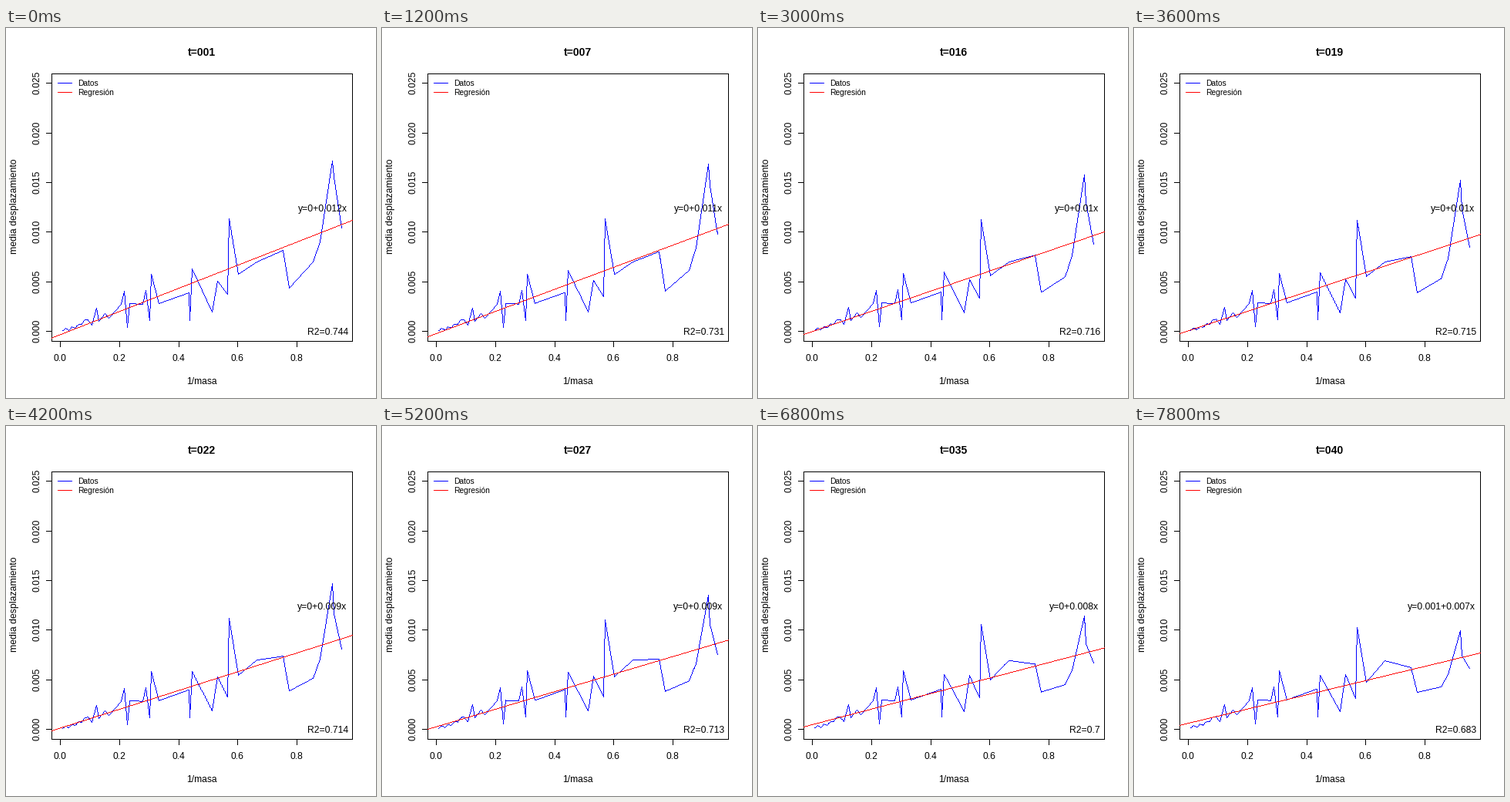
A matplotlib script that plays this animation: 480x480 px, repeating every 8 s.

```python
import numpy as np
import matplotlib.pyplot as plt
from matplotlib.animation import FuncAnimation

SIZE, DPI = 480, 100
STEPS, INTERVAL = 40, 200
PT = 72 / DPI                       # points per pixel
LEFT, RIGHT, TOP, BOTTOM = 59, 449, 59, 406
X0, X_UNIT = 69.9, 384.0            # pixel of x = 0, pixels per unit
Y0, Y_UNIT = 393.3, 12880.0
BLACK, BLUE, RED = (0, 0, 0), (0, 0, 255), (255, 0, 0)

# Heavy particles crowd at the left in a small rising zigzag
k = np.arange(9)
crowd_x = 73 + 4.1 * k
crowd_y = 391 - 0.0135 * (crowd_x - 73) ** 2 + 1.5 * (-1.0) ** k

# Peaks and dips that only creep upwards
CALM = [(111, 385), (117, 363), (120, 380), (128, 370), (133, 376), (149, 358),
        (153, 341), (157, 388), (160, 357), (177, 358), (181, 340), (186, 379),
        (188, 319), (198, 357), (237, 343), (238, 379)]
CREEP = -2.3

# Light particles: x, y, total drop, easing power
LIGHT = [(241, 312, 11, 1), (267, 368, 2, 1), (274, 328, -6, 1.2),
         (287, 345, 8, 0.6), (289, 247, 14, 2.8), (301, 319, 13, 2),
         (325, 303, 1, 3), (359, 288, 25, 1.45), (367, 337, 8, 0.4),
         (398, 303, 35, 0.62), (407, 277, 45, 0.95), (423, 172, 93, 1.7),
         (425, 193, 105, 1.2), (435, 259, 55, 1)]

calm_x, calm_y = np.transpose(CALM)
light_x, light_y, drop, power = np.transpose(LIGHT)
xs = np.concatenate([crowd_x, calm_x, light_x])

plt.rcParams["font.family"] = "Liberation Sans"
fig = plt.figure(figsize=(SIZE / DPI, SIZE / DPI), dpi=DPI, facecolor="white")
ax = fig.add_axes([0, 0, 1, 1])
ax.axis("off")
base = np.full((SIZE, SIZE, 3), 255, np.uint8)


def stroke(img, xs, ys, color=BLACK):
    """Crisp one-pixel polyline."""
    pts = list(zip(xs, ys))
    for (xa, ya), (xb, yb) in zip(pts, pts[1:]):
        n = int(np.ceil(max(abs(xb - xa), abs(yb - ya)))) + 1
        cols = np.rint(np.linspace(xa, xb, n)).astype(int)
        rows = np.rint(np.linspace(ya, yb, n)).astype(int)
        img[rows, cols] = color


def label(x, y, s, px=12, ha="center", **kw):
    return ax.text(x, y, s, fontsize=px * PT, ha=ha, va="baseline",
                   rotation_mode="anchor", **kw)


def draw_axes():
    stroke(base, [LEFT, RIGHT, RIGHT, LEFT, LEFT],
           [TOP, TOP, BOTTOM, BOTTOM, TOP])
    for i in range(5):
        x = round(X0 + 0.2 * i * X_UNIT)
        stroke(base, [x, x], [BOTTOM, BOTTOM + 7])
        label(x, 432.5, f"{0.2 * i:.1f}")
    for i in range(6):
        y = round(Y0 - 0.005 * i * Y_UNIT)
        stroke(base, [LEFT - 7, LEFT], [y, y])
        label(43, y, f"{0.005 * i:.3f}", rotation=90)
    label(254, 462, "1/masa")
    label(14, 231.5, "media desplazamiento", 12.2, rotation=90)
    for y, color, name in ((71, BLUE, "Datos"), (83, RED, "Regresión")):
        stroke(base, [67, 85], [y, y], color)
        label(93, y + 4, name, 10.2, "left")


draw_axes()
canvas = ax.imshow(base, extent=(0, SIZE, SIZE, 0), aspect="auto",
                   interpolation="nearest")
title = label(253.5, 36, "", 14, weight="bold")
equation = label(442.5, 238, "", 12.1, "right")
r2_text = label(444, 398, "", 12.1, "right")


def short(v):
    return f"{abs(round(v, 3)):g}"


def update(i):
    t = i + 1
    u = i / (STEPS - 1)
    img = base.copy()
    ys = np.concatenate([crowd_y + CREEP * u / 2, calm_y + CREEP * u,
                         light_y + drop * u ** power])
    stroke(img, xs, ys, BLUE)

    ease = u ** 1.15
    a, b = 401.6 - 13.8 * ease, 249 + 45 * ease
    stroke(img, [LEFT, RIGHT], [a, b], RED)
    canvas.set_data(img)

    rise = (a - b) / (RIGHT - LEFT)
    slope = rise * X_UNIT / Y_UNIT
    intercept = (Y0 - a + rise * (X0 - LEFT)) / Y_UNIT
    r2 = np.interp(t, [1, 7, 16, 22, 27, 35, 40],
                   [0.744, 0.731, 0.716, 0.714, 0.713, 0.7, 0.683])
    title.set_text(f"t={t:03d}")
    equation.set_text(f"y={short(intercept)}+{short(slope)}x")
    r2_text.set_text(f"R2={short(r2)}")
    return canvas, title, equation, r2_text


anim = FuncAnimation(fig, update, frames=STEPS, interval=INTERVAL,
                     repeat=True, repeat_delay=0, blit=False)
plt.show()
```
